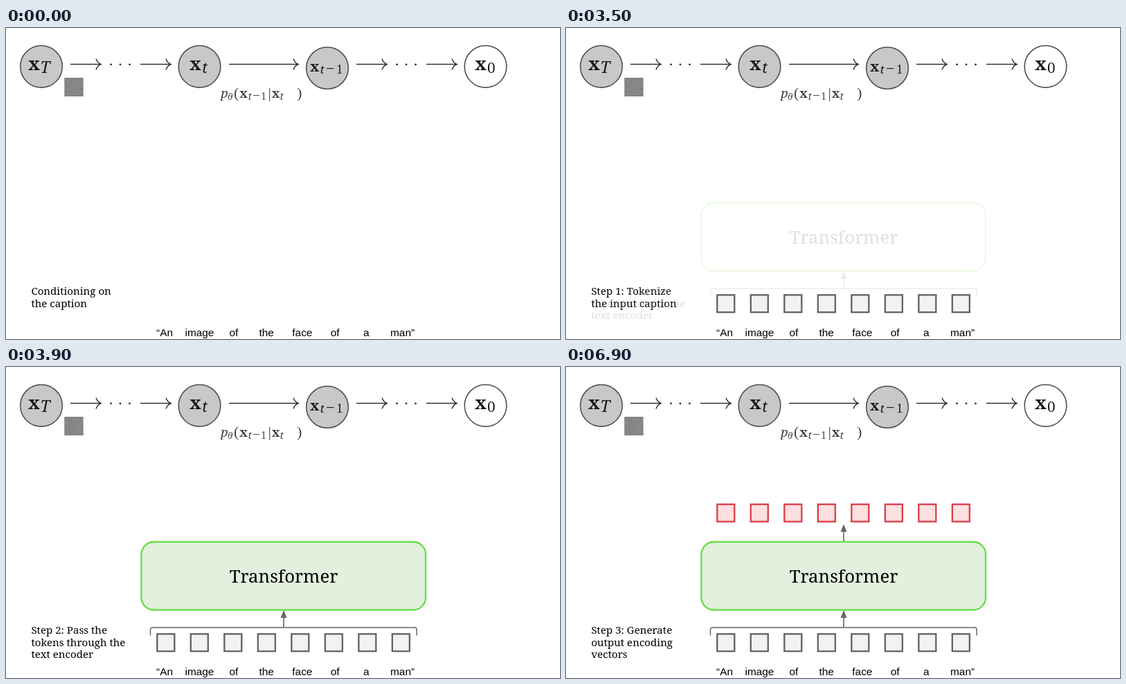
An HTML page that plays this animation: 800 px wide and 450 px high, repeating every 8 s.

```html
<!DOCTYPE html>
<html lang="en">
<head>
<meta charset="utf-8">
<title>Caption conditioning</title>
<style>
html, body { margin: 0; width: 100%; height: 100%; overflow: hidden; background: #fff; }
svg { display: block; width: 800px; height: 450px; }
.serif { font-family: "Noto Serif", serif; }
.bold { font-family: "Noto Serif", serif; font-weight: 700; }
.roman { font-family: "Liberation Serif", serif; }
.italic { font-family: "Noto Serif", serif; font-style: italic; }
.sans { font-family: "Liberation Sans", sans-serif; }
/* Inverted additive blending keeps overlapping letters black while labels cross-fade */
#labels { filter: invert(1); }
#labels g { fill: #fff; mix-blend-mode: plus-lighter; }
</style>
</head>
<body>
<svg id="stage" viewBox="0 0 800 450"></svg>
<script>
const LOOP = 8000, STEP = 100;
const FADE = [0.12, 0.48, 0.77, 0.95, 1];

const text = (x, y, size, cls, str, attrs = "") =>
  `<text x="${x}" y="${y}" font-size="${size}" class="${cls}" ${attrs}>${str}</text>`;
const circle = (x, y, fill) =>
  `<circle cx="${x}" cy="${y}" r="30.3" fill="${fill}" stroke="#505050" stroke-width="1.6"/>`;
const group = (id, content) => `<g id="${id}">${content}</g>`;

// Thin arrow with a curved, open head
const arrow = (x1, x2) =>
  `<path d="M${x1} 52.5H${x2}m-7-8q2 6 7 8q-5 2-7 8" fill="none" stroke="#333" stroke-width="1.4"/>`;
const dots = x => [0, 13.5, 27].map(d => `<circle cx="${x + d}" cy="52.8" r="1.4" fill="#222"/>`).join("");

const upArrow = (from, tip) =>
  `<path d="M401 ${from}V${tip + 8}" stroke="#666" stroke-width="1.6"/>` +
  `<path d="M401 ${tip}l4.5 11h-9z" fill="#666"/>`;

const squares = (y, fill, stroke) => Array.from({ length: 8 }, (_, i) =>
  `<rect x="${218.3 + i * 48.5}" y="${y}" width="25" height="25" fill="${fill}" stroke="${stroke}" stroke-width="2.3"/>`).join("");

const label = (id, ...lines) =>
  group(id, lines.map((s, i) => text(36.4, 386 + i * 17.5, 15.1, "serif", s)).join(""));

function noise() {
  let seed = 7, out = '<rect x="84.5" y="72" width="27" height="27" fill="#868686"/>';
  for (let i = 0; i < 324; i++) {
    seed = (seed * 16807) % 2147483647;
    const v = 127 + seed % 15;
    out += `<rect x="${84.5 + (i % 18) * 1.5}" y="${72 + Math.floor(i / 18) * 1.5}" width="1.5" height="1.5" fill="rgb(${v},${v},${v})"/>`;
  }
  return out;
}

const chain =
  circle(51, 55.8, "#c8c8c8") + circle(279.5, 55.8, "#c8c8c8") +
  circle(464, 58, "#c8c8c8") + circle(692.5, 55.8, "#fff") +
  arrow(93, 137) + dots(151.5) + arrow(194, 238) + arrow(322, 422) +
  arrow(506, 550) + dots(564.5) + arrow(607, 651) +
  '<g fill="#181818">' +
  text(32, 60.5, 26, "bold", "x") + text(49.5, 65, 23, "italic", "T") +
  text(265, 60.5, 26, "bold", "x") + text(283, 65, 22, "italic", "t") +
  text(439, 63, 20.5, "bold", "x") + text(453.5, 66, 17, "italic", "t") +
  text(462, 66, 22, "roman", "−") + text(477, 66, 19, "roman", "1") +
  text(677, 60.5, 26, "bold", "x") + text(695, 65, 23, "roman", "0") + "</g>";

const formula = '<g fill="#444">' +
  text(310, 101, 18.5, "italic", "p") + text(320, 104, 13, "italic", "θ") +
  text(329, 101, 22, "roman", "(") + text(337, 101, 18.5, "bold", "x") +
  text(349.5, 104, 14.5, "italic", "t") + text(356, 104, 19, "roman", "−") +
  text(368, 104, 16, "roman", "1") + text(378.5, 101, 22, "roman", "|") +
  text(383.5, 101, 18.5, "bold", "x") + text(395.5, 104, 14.5, "italic", "t") +
  text(420, 101, 22, "roman", ")") + "</g>";

const caption = [["“An", 217], ["image", 258.5], ["of", 322.5], ["the", 365.5],
  ["face", 413.3], ["of", 468.7], ["a", 516], ["man”", 555]]
  .map(([word, x]) => text(x, 445.5, 15.4, "sans", word)).join("");

const labels =
  '<rect x="30" y="366" width="156" height="64"/>' +
  label("label0", "Conditioning on", "the caption") +
  label("label1", "Step 1: Tokenize", "the input caption") +
  label("label2", "Step 2: Pass the", "tokens through the", "text encoder") +
  label("label3", "Step 3: Generate", "output encoding", "vectors");

const encoder =
  '<rect id="box" x="195.5" y="253" width="410.5" height="98.5" rx="18" fill="#e2f0de" stroke="#68de4e" stroke-width="2.4"/>' +
  text(401, 312, 25.7, "serif", "Transformer", 'text-anchor="middle"') +
  '<path d="M208.5 388.5V380q0-3 3-3H590q3 0 3 3V388.5" fill="none" stroke="#666" stroke-width="1.5"/>' +
  upArrow(377, 352);

const stage = document.getElementById("stage");
stage.innerHTML = chain + noise() + formula + caption + group("labels", labels) +
  group("part2", encoder) +
  group("part1", squares(386.3, "#f2f2f2", "#626262")) +
  group("part3", squares(198.7, "#fddfe0", "#db3d47") + upArrow(252, 227.5));

const set = (id, name, value) => document.getElementById(id).setAttribute(name, value);
const fadeIn = (t, start) =>
  t < start ? 0 : FADE[Math.min(FADE.length - 1, Math.floor((t - start) / STEP))];

function draw(now) {
  const t = now % LOOP;
  const shown = [1, fadeIn(t, 500), fadeIn(t, 3500), fadeIn(t, 6500), 0];
  for (let i = 0; i < 4; i++) {
    set("label" + i, "opacity", shown[i] * (1 - shown[i + 1]));
    if (i) set("part" + i, "opacity", shown[i]);
  }
  // The box stays unfilled during the first half of its fade
  set("box", "fill-opacity", shown[2] > 0.5 ? 1 : 0);
  requestAnimationFrame(() => draw(performance.now()));
}
draw(0);
</script>
</body>
</html>
```
